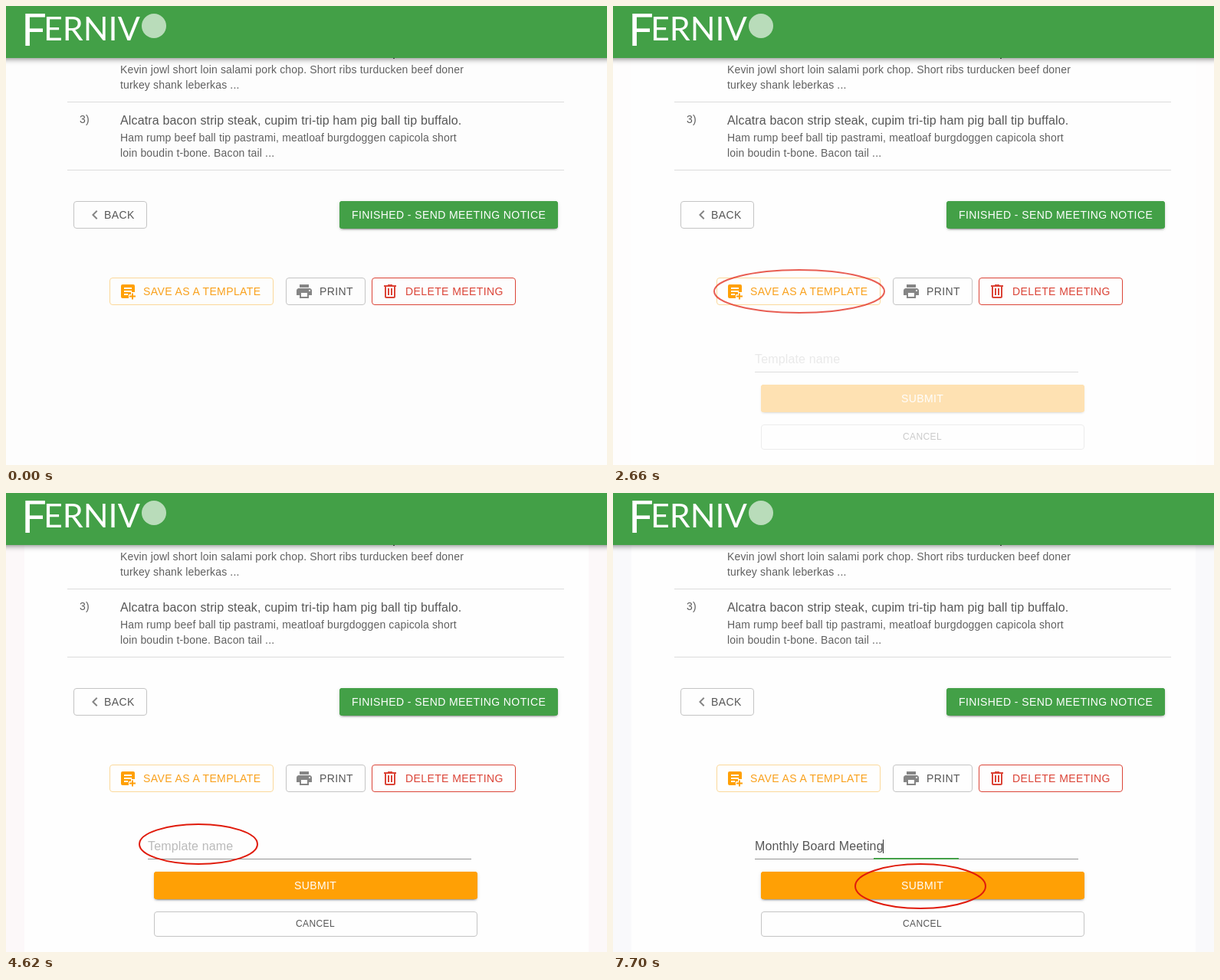
An HTML page with a canvas that plays this animation: 784 by 600 pixels, repeating every 8 s.

```html
<!DOCTYPE html>
<html lang="en">
<head>
<meta charset="utf-8">
<title>Save as a template</title>
<style>
  html, body { margin: 0; width: 100%; height: 100%; overflow: hidden; background: #fdfdfd; }
  canvas { display: block; }
</style>
</head>
<body>
<canvas id="stage" width="784" height="600"></canvas>
<script>
const W = 784, H = 600, LOOP = 8000, STEP = 60, STEPS = 10;
const SANS = '"Liberation Sans", Arial, sans-serif';
const GREEN = '#43a047', AMBER = '#ffa005', RED = '#db4437', GREY = '#858585';
const INK = '#565656', OUTLINE = '#c4c4c4';

const ICONS = {
  chevron: 'M15.41 7.41L14 6l-6 6 6 6 1.41-1.41L10.83 12z',
  print: 'M19 8H5c-1.66 0-3 1.34-3 3v6h4v4h12v-4h4v-6c0-1.66-1.34-3-3-3zm-3 11H8v-5h8v5zm3-7c-.55 0-1-.45-1-1s.45-1 1-1 1 .45 1 1-.45 1-1 1zm-1-9H6v4h12V3z',
  trash: 'M15 4V3H9v1H4v2h1v13c0 1.1.9 2 2 2h10c1.1 0 2-.9 2-2V6h1V4h-5zm2 15H7V6h10v13zM9 8h2v9H9zm4 0h2v9h-2z',
  noteAdd: 'M5 3h14a2 2 0 0 1 2 2v8h-5v3h-3v5H5a2 2 0 0 1-2-2V5a2 2 0 0 1 2-2zM7 7v2h10V7zM7 11v2h10v-2zM7 15v2h5v-2zM17 14.5h2v3h3v2h-3v3h-2v-3h-3v-2h3z'
};

const ctx = document.getElementById('stage').getContext('2d');

function layer(paint) {
  const c = document.createElement('canvas');
  c.width = W;
  c.height = H;
  paint(c.getContext('2d'));
  return c;
}

function text(g, str, x, y, size, color, spacing = 0.15, font = SANS) {
  g.font = `${size}px ${font}`;
  g.letterSpacing = spacing + 'px';
  g.fontKerning = 'normal';
  g.fillStyle = color;
  g.fillText(str, x, y);
}

function icon(g, name, x, y, color) {
  g.save();
  g.translate(x, y);
  g.fillStyle = color;
  g.fill(new Path2D(ICONS[name]), 'evenodd');
  g.restore();
}

// Each shadow: [offset y, blur, spread, alpha]
function raised(g, x, y, w, h, r, color, shadows) {
  g.save();
  g.fillStyle = color;
  for (const [dy, blur, spread, alpha] of shadows) {
    g.shadowColor = `rgba(0,0,0,${alpha})`;
    g.shadowOffsetY = dy;
    g.shadowBlur = blur;
    g.beginPath();
    g.roundRect(x - spread, y - spread, w + 2 * spread, h + 2 * spread, r);
    g.fill();
  }
  g.shadowColor = 'transparent';
  g.beginPath();
  g.roundRect(x, y, w, h, r);
  g.fill();
  g.restore();
}

const BUTTON_SHADOW = [[3, 1, -2, 0.2], [2, 2, 0, 0.14], [1, 5, 0, 0.12]];
const BAR_SHADOW = [[2, 4, -1, 0.2], [4, 5, 0, 0.14], [1, 10, 0, 0.12]];

function outlined(g, x, y, w, h, color) {
  g.strokeStyle = color;
  g.lineWidth = 1;
  g.beginPath();
  g.roundRect(x + 0.5, y + 0.5, w - 1, h - 1, 3.5);
  g.stroke();
}

function rect(g, x, y, w, h, color) {
  g.fillStyle = color;
  g.fillRect(x, y, w, h);
}

function label(g, str, x, y, color) {
  text(g, str, x, y, 14, color, 0.4);
}

const page = layer(g => {
  rect(g, 505, 67, 2, 2, INK);
  text(g, 'Kevin jowl short loin salami pork chop. Short ribs turducken beef doner', 149, 88, 14, '#606060');
  text(g, 'turkey shank leberkas ...', 149, 108, 14, '#606060');
  rect(g, 80, 125, 648, 1, '#dcdcdc');
  text(g, '3)', 96, 153, 14, '#5c5c5c');
  text(g, 'Alcatra bacon strip steak, cupim tri-tip ham pig ball tip buffalo.', 149, 155, 16, INK);
  text(g, 'Ham rump beef ball tip pastrami, meatloaf burgdoggen capicola short', 149, 177, 14, '#606060');
  text(g, 'loin boudin t-bone. Bacon tail ...', 149, 197, 14, '#606060');
  rect(g, 80, 214, 648, 1, '#dcdcdc');

  outlined(g, 88, 255, 96, 36, OUTLINE);
  icon(g, 'chevron', 104, 261, GREY);
  label(g, 'BACK', 128, 278, INK);
  raised(g, 435, 255, 285, 36, 4, GREEN, BUTTON_SHADOW);
  label(g, 'FINISHED - SEND MEETING NOTICE', 451, 278, '#fff');

  outlined(g, 135, 355, 214, 36, '#fbd89a');
  icon(g, 'noteAdd', 147, 361, AMBER);
  label(g, 'SAVE AS A TEMPLATE', 179, 378, '#f9a01b');
  outlined(g, 365, 355, 104, 36, OUTLINE);
  icon(g, 'print', 377, 361, GREY);
  label(g, 'PRINT', 409, 378, INK);
  outlined(g, 477, 355, 188, 36, RED);
  icon(g, 'trash', 489, 361, RED);
  label(g, 'DELETE MEETING', 521, 378, RED);

  raised(g, -12, -12, W + 24, 80, 0, GREEN, BAR_SHADOW);
  const logoFont = 'Lato, "Open Sans", sans-serif';
  text(g, 'F', 20, 52, 58, '#fff', 0, logoFont);
  text(g, 'ERNIV', 49, 45, 43, '#fff', 0, logoFont);
  g.fillStyle = '#b9dcba';
  g.beginPath();
  g.arc(193, 26, 16, 0, 2 * Math.PI);
  g.fill();
});

const form = layer(g => {
  rect(g, 185, 478, 422, 1, '#949494');
  raised(g, 193, 495, 422, 36, 4, AMBER, BUTTON_SHADOW);
  label(g, 'SUBMIT', 376, 518, '#fff');
  outlined(g, 193, 547, 422, 33, OUTLINE);
  text(g, 'CANCEL', 378, 567, 12, INK, 0.38);
});

const hint = layer(g => text(g, 'Template name', 185, 467, 16, '#bababa'));

const entry = layer(g => {
  text(g, 'Monthly Board Meeting', 185, 467, 16, INK);
  rect(g, 352, 453, 1, 18, '#333');
  rect(g, 340, 477, 111, 2, GREEN);
});

const ring = (x, y, rx, ry) => layer(g => {
  g.strokeStyle = '#e01b0c';
  g.lineWidth = 2;
  g.beginPath();
  g.ellipse(x, y, rx, ry, 0, 0, 2 * Math.PI);
  g.stroke();
});
const saveRing = ring(243, 373, 111, 28);
const nameRing = ring(251, 459, 77, 26);
const submitRing = ring(401, 514, 85, 29);

// Stepped fade, 0 before start and 1 on its tenth step
function fade(t, start) {
  const n = Math.floor((t - start) / STEP) + 1;
  return Math.min(Math.max(n, 0), STEPS) / STEPS;
}

function show(image, alpha) {
  if (alpha <= 0) return;
  ctx.globalAlpha = alpha;
  ctx.drawImage(image, 0, 0);
  ctx.globalAlpha = 1;
}

function margins(color, alpha) {
  ctx.globalAlpha = alpha;
  rect(ctx, 0, 0, 24, H, color);
  rect(ctx, 760, 0, 24, H, color);
  ctx.globalAlpha = 1;
}

function draw(t) {
  const ring1 = fade(t, 1000), opened = fade(t, 2540), ring2 = fade(t, 4080);
  const typed = fade(t, 5620), ring3 = fade(t, 7160);

  rect(ctx, 0, 0, W, H, '#fdfdfd');
  ctx.globalAlpha = opened;
  rect(ctx, 0, 0, W, H, '#fefefe');
  margins('#fcf8f9', opened);
  margins('#f9f9fb', ring3);

  show(page, 1);
  show(form, opened);
  show(hint, opened * (1 - typed));
  show(entry, typed);
  show(saveRing, ring1 * (1 - opened));
  show(nameRing, ring2 * (1 - typed));
  show(submitRing, ring3);
}

function tick() {
  draw(performance.now() % LOOP);
  requestAnimationFrame(tick);
}
tick();
</script>
</body>
</html>
```
